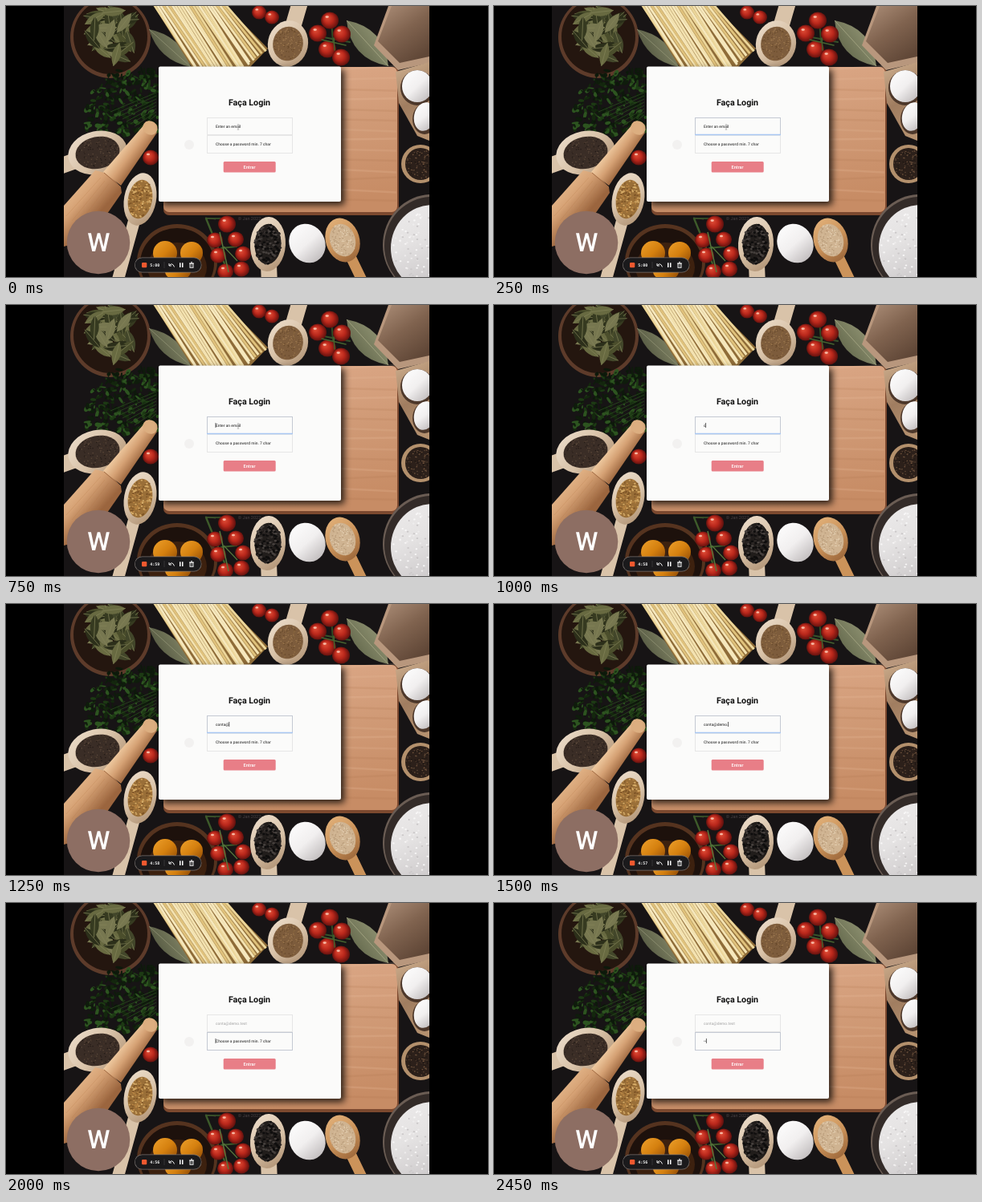
These frames come from a looping animation (600x338 px, 2.5 s). An HTML page with a canvas:

```html
<!DOCTYPE html>
<html lang="pt">
<head>
<meta charset="utf-8">
<title>Faça Login</title>
<style>
  html, body { margin: 0; width: 100%; height: 100%; overflow: hidden; background: #000; }
  canvas { display: block; width: 600px; height: 338px; }
</style>
</head>
<body>
<canvas id="stage" width="600" height="338"></canvas>
<script>
const W = 600, H = 338, LOOP = 2500, TAU = Math.PI * 2;
const EMAIL = 'conta@demo.test';
const PALE = ['#eee0cf', '#d9c3a9', '#a98a6b'];
const ORANGE = ['#e5b57e', '#cb935a', '#935f35'];
const stage = document.getElementById('stage').getContext('2d');
const backdrop = document.createElement('canvas');
backdrop.width = W;
backdrop.height = H;
let c = backdrop.getContext('2d');

let seed = 7;
function rnd() {
  seed = (seed * 16807) % 2147483647;
  return seed / 2147483647;
}
const pick = list => list[Math.floor(rnd() * list.length)];

function ell(x, y, rx, ry, fill, rot = 0) {
  c.fillStyle = fill;
  c.beginPath();
  c.ellipse(x, y, rx, ry, rot, 0, TAU);
  c.fill();
}
function poly(points, fill) {
  c.fillStyle = fill;
  c.beginPath();
  points.forEach(p => c.lineTo(p[0], p[1]));
  c.closePath();
  c.fill();
}
function line(x1, y1, x2, y2, color, width) {
  c.strokeStyle = color;
  c.lineWidth = width;
  c.beginPath();
  c.moveTo(x1, y1);
  c.lineTo(x2, y2);
  c.stroke();
}
function box(x, y, w, h, r, fill) {
  c.fillStyle = fill;
  c.beginPath();
  c.roundRect(x, y, w, h, r);
  c.fill();
}
function text(str, x, y, font, color, align = 'left') {
  c.font = font;
  c.fillStyle = color;
  c.textAlign = align;
  c.textRendering = 'geometricPrecision';
  c.fillText(str, x, y);
}
function shade(x1, y1, x2, y2, ...colors) {
  const g = c.createLinearGradient(x1, y1, x2, y2);
  colors.forEach((col, i) => g.addColorStop(i / (colors.length - 1), col));
  return g;
}
function specks(x, y, rx, ry, rot, n, size, colors) {
  for (let i = 0; i < n; i++) {
    const a = rnd() * TAU, d = Math.sqrt(rnd());
    const u = Math.cos(a) * d * rx, v = Math.sin(a) * d * ry;
    ell(x + u * Math.cos(rot) - v * Math.sin(rot),
        y + u * Math.sin(rot) + v * Math.cos(rot), size, size * .8, pick(colors));
  }
}
function leaf(x1, y1, x2, y2, width, color, vein) {
  const mx = (x1 + x2) / 2, my = (y1 + y2) / 2, len = Math.hypot(x2 - x1, y2 - y1);
  const nx = (y1 - y2) / len * width, ny = (x2 - x1) / len * width;
  c.fillStyle = color;
  c.beginPath();
  c.moveTo(x1, y1);
  c.quadraticCurveTo(mx + nx, my + ny, x2, y2);
  c.quadraticCurveTo(mx - nx, my - ny, x1, y1);
  c.fill();
  line(x1, y1, x2, y2, vein, .7);
}
function tomato(x, y, r) {
  const g = c.createRadialGradient(x - r * .3, y - r * .35, 1, x, y, r);
  g.addColorStop(0, '#dd4a34');
  g.addColorStop(.5, '#b9271b');
  g.addColorStop(1, '#5f100d');
  ell(x, y, r, r * .95, g);
  ell(x - r * .3, y - r * .4, r * .2, r * .13, '#f7b9a5');
}
function egg(x, y, rx, ry, rot = 0) {
  ell(x, y, rx, ry, shade(x - rx, y - ry, x + rx, y + ry, '#fff', '#f1efef', '#b5b0b1'), rot);
}
function spoon(x, y, rx, ry, rot, hx, hy, width, wood, content, grains, size) {
  c.lineCap = 'round';
  line(x, y, hx, hy, wood[1], width);
  ell(x, y, rx, ry, shade(x - rx, y - ry, x + rx, y + ry, ...wood), rot);
  ell(x, y, rx * .75, ry * .74, content, rot);
  specks(x, y, rx * .73, ry * .72, rot, 150, size, grains);
  c.lineCap = 'butt';
}

function drawTopFood() {
  ell(130, 39, 50, 51, '#5d3b2a');
  ell(130, 38, 46, 47, '#24160f');
  const greens = ['#4b4e2c', '#686a41', '#363a20', '#777750', '#42462a', '#2c2f1a'];
  for (let i = 0; i < 42; i++) {
    const a = rnd() * TAU, d = Math.sqrt(rnd()) * 30, b = rnd() * TAU;
    const x = 130 + Math.cos(a) * d, y = 36 + Math.sin(a) * d;
    const dx = Math.cos(b) * 15, dy = Math.sin(b) * 15;
    leaf(x - dx, y - dy, x + dx, y + dy, 11, pick(greens), '#85845a');
  }
  leaf(178, 29, 230, 76, 21, shade(180, 60, 215, 40, '#4e523c', '#7d8062'), '#999a7a');

  poly([[184, 0], [274, 0], [326, 53], [304, 76], [231, 76]], '#8f6c38');
  for (let i = 0; i < 25; i++) {
    const x = 184 + i * 3.7;
    line(x, -2, x + 48 + rnd() * 5, 76 - Math.max(0, i - 17) * 2.8,
      pick(['#f3e2b0', '#ecd69a', '#e0c27c', '#f6e8bd']), 2.9);
  }

  spoon(351, 47, 25, 29, .2, 367, -8, 20, PALE, '#7d5c3c', ['#a17c52', '#644629', '#8b683f'], .8);
  leaf(424, 18, 476, 75, 29, shade(430, 60, 465, 35, '#61664a', '#8d9070'), '#b0b08d');
  c.lineCap = 'round';
  line(405, 18, 408, 58, '#2f4a24', 2);
  line(390, 38, 428, 45, '#36522a', 2);
  [[403, 18, 11], [315, 8, 9], [331, 14, 9], [388, 34, 11],
   [418, 35, 11], [400, 54, 11], [417, 64, 11]].forEach(t => tomato(...t));
  line(393, 42, 423, 49, '#46622f', 1.5);
  line(408, 40, 409, 55, '#46622f', 1.5);
  c.lineCap = 'butt';
}

function drawRightFood() {
  poly([[476, 0], [527, 0], [527, 71], [488, 80], [458, 49]], '#b8977d');
  poly([[480, 0], [527, 0], [527, 63], [490, 71], [463, 44]],
    shade(470, 0, 515, 65, '#a98b75', '#80634f', '#604737'));
  poly([[485, 82], [527, 70], [527, 168], [512, 162], [489, 121]],
    shade(485, 80, 527, 160, '#c7a787', '#a07d60', '#b5916f'));
  ell(512, 102, 21, 22, '#4d382b');
  egg(512, 100, 19, 20);
  ell(521, 141, 15, 19, '#4d382b');
  egg(521, 138, 13, 18, .2);
  ell(516, 197, 24, 24, '#b3906c');
  ell(516, 197, 19, 20, '#2c201a');
  specks(516, 197, 18, 18, 0, 120, .9, ['#594333', '#211915', '#74563f']);
  ell(530, 298, 61, 63, '#6b5d54');
  ell(530, 299, 59, 61, '#332b28');
  ell(531, 302, 52, 54, shade(485, 250, 527, 338, '#eceaea', '#e4e2e2', '#cfcccd'));
  specks(528, 302, 46, 47, 0, 150, 1.3, ['#f8f7f7', '#cbc8c9', '#eeecec']);
}

function drawBoard() {
  box(196, 76, 293, 185, 7, '#7c492f');
  box(196, 76, 291, 181, 7, shade(300, 76, 330, 257, '#dca887', '#d09a76', '#c78c65'));
  for (let i = 0; i < 14; i++) {
    const y = 79 + i * 12.5, drift = rnd() * 8 - 4;
    line(417, y, 486, y + drift, pick(['#e5b89830', '#a86e4a28', '#edc6a530']), 2.5);
  }
  text('© Jan 2022', 303, 267, '5.5px Roboto, sans-serif', '#4a4243', 'center');
  line(248, 264, 261, 266, '#4c4039', 1);
}

function drawLeftFood() {
  for (let i = 0; i < 330; i++) {
    const x = 100 + rnd() * 89, y = 80 + rnd() * 82;
    if (x + y < 214) continue;
    ell(x, y, 1 + rnd() * 4, .8 + rnd() * 2, pick(['#0d190b', '#14270e', '#1d3a14', '#2d5420', '#0f1c0c']), rnd() * 3);
  }
  for (let i = 0; i < 8; i++) line(187, 108 + i * 4, 130 + i * 5, 132 + i * 3, '#2c4c20', .8);
  spoon(114, 183, 37, 27, -.2, 67, 200, 20, PALE, '#3a2d26', ['#221a16', '#5e4b3c', '#44342a'], .8);
  tomato(180, 189, 10);

  const wood = shade(96, 200, 136, 236, '#e9bf93', '#d6a275', '#9b653e');
  poly([[111, 205], [127, 209], [143, 226], [144, 233], [104, 291], [72, 300], [72, 249]], wood);
  poly([[172, 148], [188, 158], [143, 224], [121, 207]],
    shade(146, 176, 166, 191, '#edc79d', '#d5a174', '#a56f46'));
  ell(179.5, 152, 9.5, 8.5, '#dcae80', .6);
  line(122, 208, 143, 226, '#a36d45', 1);
  for (let i = 0; i < 4; i++) line(118 + i * 5, 214 + i * 4, 75 + i * 7, 262 + i * 6, '#b57a4740', 1);

  spoon(167, 241, 20, 33, .18, 140, 339, 15, PALE, '#9a6f38', ['#d6ac68', '#b98645', '#7e5527'], 1.2);
}

function drawBottomFood() {
  ell(213, 319, 50, 47, '#55331f');
  ell(213, 321, 46, 44, '#1d110c');
  ell(213, 326, 37, 31, '#3d210f');
  [[198, 308, 15, 15], [231, 308, 14, 14], [214, 331, 16, 11]].forEach(([x, y, rx, ry]) => {
    ell(x, y, rx, ry, shade(x - rx, y - ry, x + rx, y + ry, '#eda02b', '#d5800f', '#8c4806'));
  });

  c.lineCap = 'round';
  line(249, 265, 278, 336, '#3d5a2a', 2.4);
  line(249, 265, 271, 265, '#3d5a2a', 1.6);
  line(268, 302, 287, 300, '#3d5a2a', 2);
  c.lineCap = 'butt';
  [[275, 272, 11], [260, 292, 10], [286, 291, 10], [264, 311, 10],
   [295, 309, 10], [293, 328, 10], [273, 331, 10]].forEach(t => tomato(...t));
  line(266, 282, 277, 332, '#57763c', 1.5);
  line(271, 300, 288, 318, '#57763c', 1.2);

  spoon(326, 297, 22, 34, .05, 328, 348, 20, PALE, '#211d1b', ['#0e0d0d', '#47413e', '#2c2725'], 1.7);
  egg(375, 296, 22, 25, -.5);
  spoon(419, 292, 21, 28, -.3, 446, 348, 13, ORANGE, '#cfb391', ['#e4d0b3', '#b79a78', '#d7be9d'], .9);
}

function drawCard() {
  c.save();
  c.shadowColor = '#000c';
  c.shadowBlur = 9;
  c.shadowOffsetX = 4;
  c.shadowOffsetY = 4;
  box(190, 75.5, 227, 168.5, 2, '#fbfbfa');
  c.restore();
  ell(228, 173, 6, 6, '#f2f1f0');
  text('Faça Login', 303, 124, 'bold 10.7px Roboto, sans-serif', '#111', 'center');
  box(270.7, 194, 65, 13.5, 1.5, '#e87e87');
  text('Entrar', 303, 202.7, '500 5.6px Roboto, sans-serif', '#fff', 'center');
}

function drawRecorder() {
  ell(115, 295, 39.3, 39.3, '#8d6e63');
  text('W', 115.3, 306, '500 32px Roboto, sans-serif', '#fff', 'center');
  box(160, 313.5, 83.5, 19, 9.5, '#77716e');
  box(160.7, 314.2, 82.1, 17.6, 8.8, '#1b1a1c');
  box(169, 320, 6.3, 6.3, 1.2, '#f0592f');
  line(197, 319, 197, 327, '#444', .7);
  c.strokeStyle = '#eee';
  c.lineWidth = 1;
  c.beginPath();
  c.moveTo(203, 321);
  c.lineTo(203, 324);
  c.lineTo(206, 324);
  c.moveTo(203, 324);
  c.quadraticCurveTo(207, 319, 209.5, 325.5);
  c.stroke();
  box(216, 320.3, 1.5, 5.6, .3, '#fff');
  box(219, 320.3, 1.5, 5.6, .3, '#fff');
  line(228, 321, 234, 321, '#eee', 1);
  line(230, 319.7, 232, 319.7, '#eee', 1);
  c.strokeRect(229, 321.5, 4, 4.8);
  line(231, 322.5, 231, 325.5, '#eee', .6);
}

function drawBackdrop() {
  c.fillStyle = '#000';
  c.fillRect(0, 0, W, H);
  c.save();
  c.beginPath();
  c.rect(72, 0, 455, H);
  c.clip();
  c.fillStyle = '#171415';
  c.fillRect(72, 0, 455, H);
  drawBoard();
  drawTopFood();
  drawRightFood();
  drawLeftFood();
  drawBottomFood();
  drawCard();
  drawRecorder();
  c.restore();
}

function field(y, h, active, value, color, caret) {
  c.strokeStyle = active ? '#c4c9d3' : '#e6e6e6';
  c.lineWidth = 1;
  c.strokeRect(250.5, y + .5, 106, h);
  text(value, 261, y + 12.6, '500 4.9px Roboto, sans-serif', color);
  if (caret !== null) {
    const x = 261 + c.measureText(caret).width;
    line(x, y + 8, x, y + 14, '#222', .7);
  }
}

function drawPointer() {
  line(289, 148, 289, 154, '#999', .7);
  line(287.8, 147.8, 290.2, 147.8, '#999', .6);
  line(287.8, 154.2, 290.2, 154.2, '#999', .6);
}

function draw(t) {
  c.drawImage(backdrop, 0, 0);
  const onEmail = t >= 200 && t < 1850;
  const onPassword = t >= 1850;
  const typed = EMAIL.slice(0, Math.max(0, Math.floor((t - 950) / 50)));
  const dots = '•'.repeat(Math.max(0, Math.floor((t - 2250) / 100)));

  field(161, 22, onPassword, dots || 'Choose a password min. 7 char', '#444', onPassword ? dots : null);
  field(139, 21, onEmail, typed || 'Enter an email', onPassword ? '#b4b4b4' : '#444',
    onEmail && t >= 500 ? typed : null);
  if (onEmail) line(250, 160.5, 357, 160.5, '#a9c7f3', 1.6);
  if (!typed) drawPointer();

  const left = 300 - Math.floor(t / 500);
  const clock = Math.floor(left / 60) + ':' + String(left % 60).padStart(2, '0');
  text(clock, 179.3, 325, 'bold 5px "DejaVu Sans Mono", monospace', '#f4f4f4');
}

drawBackdrop();
c = stage;
const start = performance.now();
function tick() {
  draw((performance.now() - start) % LOOP);
  requestAnimationFrame(tick);
}
tick();
</script>
</body>
</html>
```
